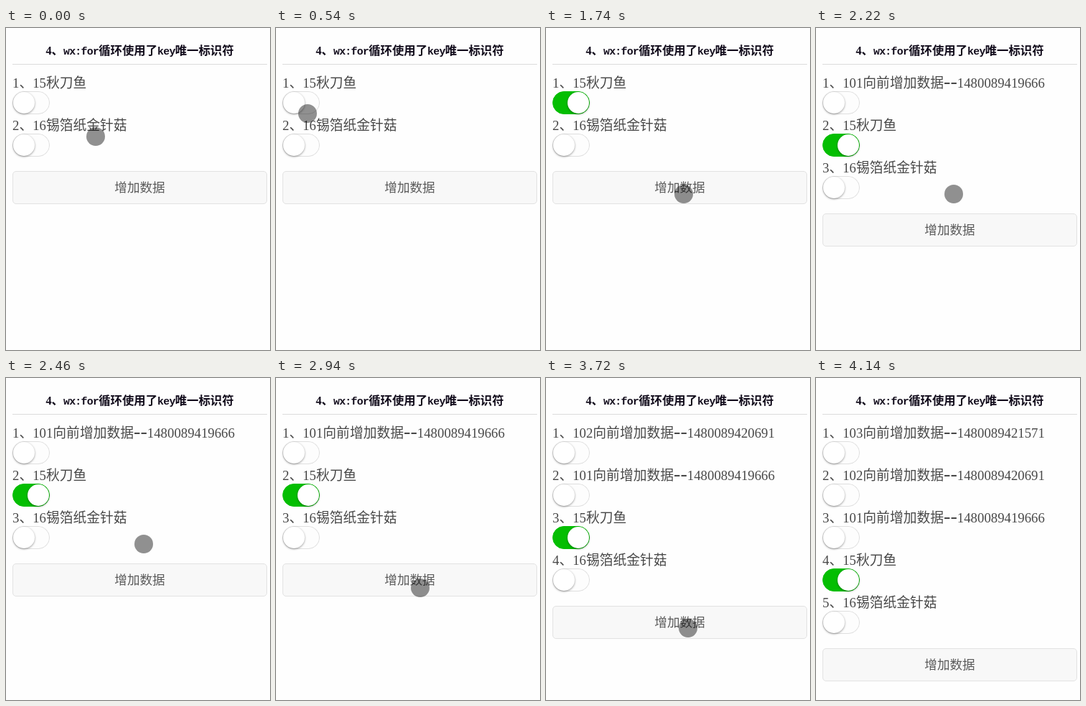
An HTML page for the animation above (4680 ms loop, 368 by 448 pixels).

```html
<!DOCTYPE html>
<html lang="zh-CN">
<head>
<meta charset="utf-8">
<style>
  html, body { margin: 0; width: 100%; height: 100%; overflow: hidden; background: #fefefe; }
  body { font: 300 18.8px/26px "Liberation Serif", "Noto Sans CJK SC", "Noto Sans CJK", serif; color: #484848; }
  #stage { position: relative; width: 368px; height: 448px; overflow: hidden; }
  #stage > *, .row > * { position: absolute; box-sizing: border-box; white-space: nowrap; }
  h1 {
    left: 9px; top: 19px; width: 355px; height: 32px; margin: 0;
    border-bottom: 1px solid #dcdcdc; text-align: center;
    font-size: 16.4px; font-weight: 700; line-height: 26px; color: #120c1c;
  }
  h1 span { font: 700 14.9px/1 "Liberation Mono", monospace; letter-spacing: -.05em; }
  .row { left: 9px; }
  .row p { margin: 0; top: -1px; }
  .row p span { font-size: 1.5em; line-height: 0; }
  .switch { top: 23px; width: 52px; height: 32px; border: 1px solid #dfdfdf; border-radius: 16px; background: #dfdfdf; }
  .switch.on { border-color: #04be02; background: #04be02; }
  .switch i, .switch b { position: absolute; left: 0; top: 0; height: 30px; border-radius: 15px; }
  .switch i { width: 50px; background: #fdfdfd; }
  .switch b { width: 30px; background: #fff; box-shadow: 0 1px 3px rgba(0, 0, 0, .4); }
  #add {
    left: 9px; width: 355px; height: 46px; border: 1px solid #e2e2e2; border-radius: 5px;
    background: #f8f8f8; text-align: center; font-size: 17.6px; line-height: 45px; color: #5a5a5a;
  }
  #add.down { background: #e5e5e5; border-color: #d2d2d2; }
  #touch { left: -13px; top: -13px; width: 26px; height: 26px; border-radius: 50%; background: rgba(0, 0, 0, .43); }
</style>
</head>
<body>
<div id="stage">
  <h1>4、<span>wx:for</span>循环使用了<span>key</span>唯一标识符</h1>
  <div id="add">增加数据</div>
  <div id="touch"></div>
</div>
<script>
const LOOP = 4680, STEP = 60, ROW = 59;
const TOGGLE = { at: 1080, span: 300 };
const stage = document.getElementById('stage');
const add = document.getElementById('add');
const touch = document.getElementById('touch');

// Top to bottom; `at` is when the row is inserted.
const added = (id, stamp) => `${id}向前增加数据<span>--</span>${stamp}`;
const items = [
  { at: 4020, text: added(103, 1480089421571) },
  { at: 3180, text: added(102, 1480089420691) },
  { at: 2100, text: added(101, 1480089419666) },
  { at: 0, text: '15秋刀鱼', toggles: true },
  { at: 0, text: '16锡箔纸金针菇' }
];
const presses = [[2040, 2220], [3120, 3300], [3960, 4080]];
const path = [
  [60, 125, 151], [540, 44, 119], [1440, 44, 119], [1740, 192, 231], [2520, 192, 231],
  [2940, 201, 292], [3180, 201, 292], [3600, 198, 348], [4020, 198, 348], [4140, 200, 464]
];

const clamp = p => Math.min(1, Math.max(0, p));
const smooth = p => p * p * (3 - 2 * p);
const easeOut = p => 1 - Math.pow(1 - p, 2.7);

for (const item of items) {
  const row = item.row = document.createElement('div');
  row.className = 'row';
  row.innerHTML = '<p></p><div class="switch"><i></i><b></b></div>';
  stage.insertBefore(row, add);
}

function setSwitch(row, p) {
  row.querySelector('.switch').classList.toggle('on', p > 0);
  row.querySelector('i').style.transform = `scale(${1 - p})`;
  row.querySelector('b').style.transform = `translateX(${20 * p}px)`;
}

function touchAt(t) {
  let a = path[0];
  for (const b of path) {
    if (t < b[0]) {
      const p = smooth(clamp((t - a[0]) / (b[0] - a[0] || 1)));
      return [a[1] + (b[1] - a[1]) * p, a[2] + (b[2] - a[2]) * p];
    }
    a = b;
  }
  return [a[1], a[2]];
}

function draw(t) {
  let n = 0;
  for (const { at, text, toggles, row } of items) {
    row.style.display = t >= at ? 'block' : 'none';
    if (t < at) continue;
    row.style.top = 65 + ROW * n + 'px';
    const label = `${++n}、${text}`;
    if (row.label !== label) row.firstChild.innerHTML = row.label = label;
    if (toggles) setSwitch(row, easeOut(clamp((t - TOGGLE.at) / TOGGLE.span)));
  }
  add.style.top = 81 + ROW * n + 'px';
  add.classList.toggle('down', presses.some(([from, to]) => t >= from && t < to));
  const [x, y] = touchAt(t);
  touch.style.transform = `translate(${x}px, ${y}px)`;
}

const start = performance.now();
function tick() {
  const t = (performance.now() - start) % LOOP;
  draw(Math.floor(t / STEP) * STEP);
  requestAnimationFrame(tick);
}
tick();
</script>
</body>
</html>
```
